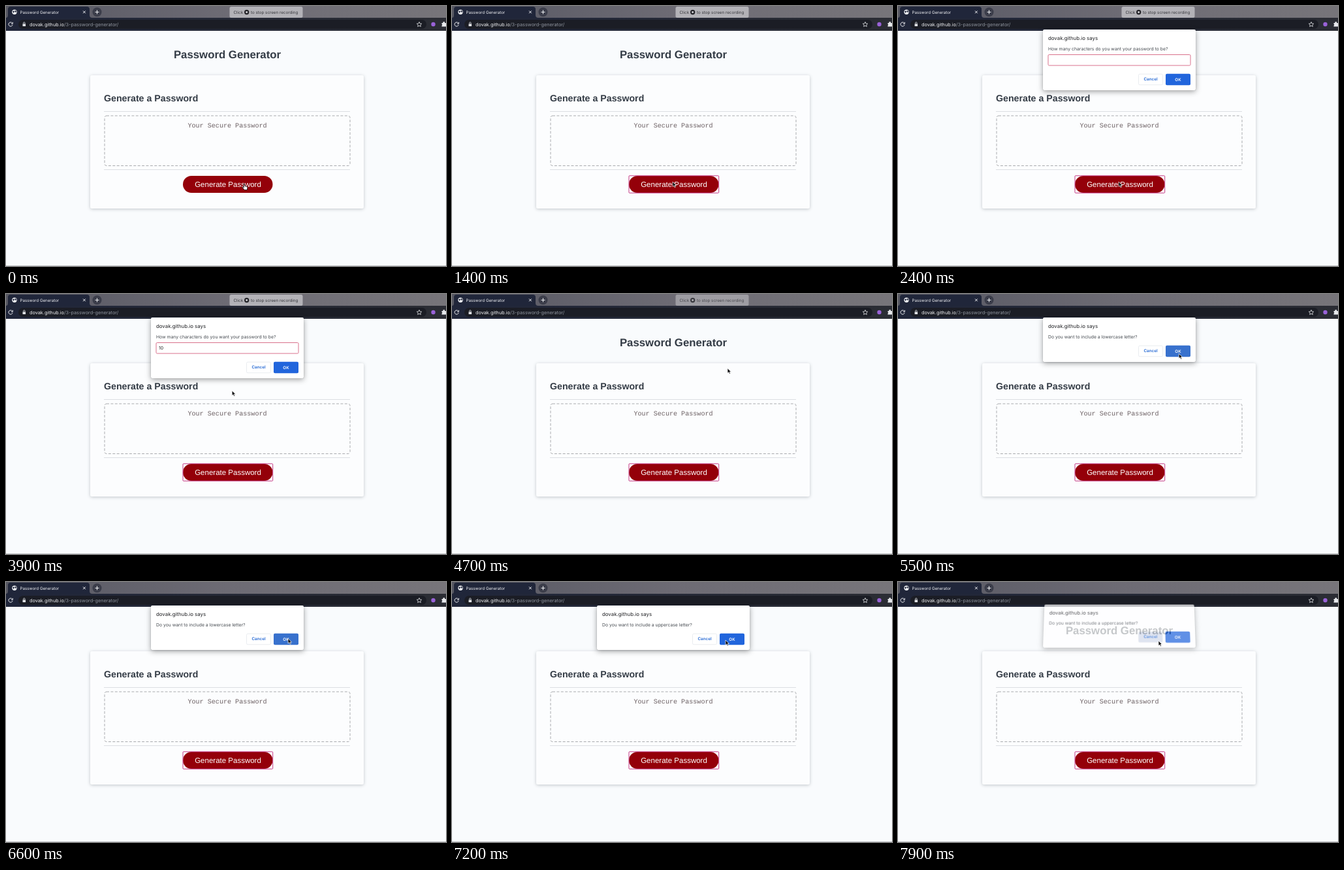
These frames come from a looping animation (674x398 px, 8000 ms). An HTML page:

```html
<!DOCTYPE html>
<html lang="en">
<head>
<meta charset="utf-8">
<title>Password Generator</title>
<style>
html, body { margin: 0; width: 100%; height: 100%; overflow: hidden; background: #f9fbfd; }
svg { position: absolute; left: 0; top: 0; display: block; overflow: visible; }
text { font-family: Inter, Roboto, sans-serif; text-rendering: geometricPrecision; white-space: pre; }
.page text { font-family: "Liberation Sans", Arial, sans-serif; }
.page .mono { font-family: "Liberation Mono", "Courier New", monospace; }
.mid { text-anchor: middle; }
#card { filter: drop-shadow(0 1px 2.5px rgba(20, 30, 40, .24)); }
#dialog {
  position: absolute; left: 222px; top: 36px; width: 234px; border-radius: 2px;
  background: #fff; box-shadow: 0 2px 8px rgba(0, 0, 0, .38), 0 0 1px rgba(0, 0, 0, .4);
  transform-origin: 50% 100%;
}
#dialog text { font-size: 6.83px; fill: #454a50; }
#dialog .btn { font-size: 6.3px; font-weight: 600; }
</style>
</head>
<body>
<svg width="674" height="398" viewBox="0 0 674 398">
  <defs>
    <linearGradient id="strip">
      <stop offset="0" stop-color="#565762"/>
      <stop offset=".5" stop-color="#6d6b74"/>
      <stop offset="1" stop-color="#77757a"/>
    </linearGradient>
    <linearGradient id="bar">
      <stop offset="0" stop-color="#20263a"/>
      <stop offset="1" stop-color="#2b2d34"/>
    </linearGradient>
  </defs>

  <!-- browser window -->
  <rect width="674" height="18" fill="url(#strip)"/>
  <rect y="18" width="674" height="20" fill="url(#bar)"/>
  <path d="M0 18Q3 18 3 14V5Q3 1 7 1H124Q128 1 128 5V14Q128 18 132 18Z" fill="#20263a"/>
  <rect x="19" y="21" width="625" height="14" rx="7" fill="#1b1d25"/>
  <circle cx="13" cy="9.3" r="3.7" fill="#eef0f3"/>
  <path d="M10 8.2l2.3-.9 1.2 1.2-1.6 1.3 .2 1.6zM14 6.4l2 1.4-.6 2.4-1.6-1.4z" fill="#20263a"/>
  <text x="21.5" y="11.6" font-size="6.2" fill="#f1f2f5">Password Generator</text>
  <path d="M118 7.4l3.8 3.8m0-3.8l-3.8 3.8" stroke="#f1f2f5"/>
  <circle cx="139.5" cy="9.3" r="7" fill="#3b3d4a"/>
  <path d="M136.5 9.3h6m-3-3v6" stroke="#f1f2f5"/>
  <path d="M9.6 26.2a3.1 3.1 0 1 0 .5 2.5M10.3 24.8v2.3h-2.4" fill="none" stroke="#f1f2f5"/>
  <rect x="25.5" y="27.2" width="4.6" height="3.8" rx=".5" fill="#dfe1e5"/>
  <path d="M26.6 27.2v-1.3a1.2 1.2 0 0 1 2.4 0v1.3" fill="none" stroke="#dfe1e5" stroke-width=".8"/>
  <text x="36" y="30.6" font-size="7.3" fill="#f1f2f5">dovak.github.io<tspan fill="#9096a0">/3-password-generator/</tspan></text>
  <path d="M633 24.4l1.1 2.4 2.6.3-1.9 1.8.5 2.6-2.3-1.3-2.3 1.3.5-2.6-1.9-1.8 2.6-.3z" fill="none" stroke="#e8eaed" stroke-width=".8"/>
  <circle cx="654.5" cy="28" r="3.2" fill="#9a62d8"/>
  <path d="M667.5 26h2a1.4 1.4 0 1 1 2.6 0h2v5.6h-6.6v-1.8a1.2 1.2 0 0 0 0-2.2z" fill="#e8eaed"/>
  <g id="pill">
    <rect x="342.5" y="1" width="112" height="17" rx="2.5" fill="#b3b2b7"/>
    <g font-size="6.25" fill="#37373c">
      <text x="348.5" y="11.7">Click</text>
      <circle cx="368.7" cy="9.5" r="3.7" fill="#26262b"/>
      <circle cx="368.7" cy="9.5" r="1.4" fill="#d8d8db"/>
      <text x="375" y="11.7">to stop screen recording</text>
    </g>
  </g>

  <!-- page -->
  <g class="page">
    <rect y="38" width="674" height="360" fill="#f9fbfd"/>
    <rect y="397" width="674" height="1" fill="#c6c8cb"/>
    <text class="mid" x="339" y="80.3" font-size="16.8" font-weight="700" fill="#343c46">Password Generator</text>
    <rect id="card" x="129" y="106" width="419" height="204" rx="2.5" fill="#fcfdfe"/>
    <text x="150" y="146.4" font-size="14.2" font-weight="700" fill="#343c46">Generate a Password</text>
    <path d="M150 161.5h377M150 250.5h377" stroke="#dcdfe3"/>
    <rect x="151" y="168" width="376" height="76.5" rx="3" fill="none" stroke="#a9abae" stroke-dasharray="4 2.4"/>
    <text class="mid mono" x="339" y="185.6" font-size="10.1" fill="#6c6063">Your Secure Password</text>
    <rect x="271" y="260" width="137.5" height="26" rx="13" fill="#940009"/>
    <text class="mid" x="340" y="276.9" font-size="11.5" fill="#fff">Generate Password</text>
    <rect id="focus" x="271" y="259.8" width="137.7" height="26.4" rx="1" fill="none" stroke="#c53b86"/>
  </g>
</svg>

<div id="dialog">
  <svg width="234" height="93">
    <text x="8" y="16.2" style="font-size:7.85px;fill:#202124">dovak.github.io says</text>
    <text id="question" x="8" y="31.8"></text>
    <g id="field">
      <rect x="8" y="38.5" width="218" height="16.5" rx="1.5" fill="#fff" stroke="#d9718c"/>
      <text id="typed" x="12" y="49.3" style="fill:#222"></text>
    </g>
    <g id="buttons">
      <rect id="cancel" x="146.5" y=".5" width="37" height="16.5" rx="2" stroke="#e4e7ec" stroke-width=".8"/>
      <text class="btn mid" x="165" y="10.8" style="fill:#2267d3">Cancel</text>
      <rect id="ok" x="188" width="38" height="17.5" rx="2"/>
      <text class="btn mid" x="207" y="10.9" style="fill:#fff">OK</text>
    </g>
  </svg>
</div>

<svg width="674" height="398">
  <path id="arrow" d="M0 0V7.6L1.8 6 3 8.7 4.4 8.1 3.2 5.5H5.6Z" fill="#0b0b0d" stroke="#fff" stroke-width=".7"/>
  <path id="hand" d="M-1-3.3q1-1 1.6 0l.4 3 3.1.7q1.1.4.9 1.6L4.3 5.5H.2L-2.7 2q-.3-1.2 1-.9l1 .9z" fill="#fff" stroke="#17171a" stroke-width=".9"/>
</svg>

<script>
const $ = id => document.getElementById(id);
const LOOP = 8000;
const clamp = x => Math.max(0, Math.min(1, x));
const between = (t, a, b) => t >= a && t < b;

// each prompt: opening start, closing start, height, question
const prompts = [
  { open: 1500, close: 4450, h: 93, text: "How many characters do you want your password to be?" },
  { open: 4750, close: 6620, h: 68, text: "Do you want to include a lowercase letter?" },
  { open: 6830, close: 7800, h: 68, text: "Do you want to include a uppercase letter?" }
];

// pointer path: time, x, y
const path = [
  [0, 365, 276], [100, 365, 276], [500, 337, 274], [1100, 337, 274], [1300, 338, 269],
  [3600, 338, 269], [3900, 346, 148], [4300, 422, 113], [4900, 422, 114], [5150, 424, 108],
  [5600, 432, 86.5], [7100, 432, 86.5], [7200, 419, 89], [7600, 399, 90], [8000, 399, 90]
];

function pointer(t) {
  const i = path.findIndex(p => p[0] > t);
  const [t0, x0, y0] = path[i - 1], [t1, x1, y1] = path[i];
  const k = (t - t0) / (t1 - t0);
  return [x0 + (x1 - x0) * k, y0 + (y1 - y0) * k];
}

function openness(p, t) {
  const rise = clamp((t - p.open) / 220), fall = clamp((t - p.close) / 190);
  return (1 - (1 - rise) ** 2) * (1 - fall ** 2);
}

function drawDialog(t) {
  const p = prompts.find(p => between(t, p.open, p.close + 190));
  const style = $("dialog").style;
  style.display = p ? "block" : "none";
  if (!p) return;
  const k = openness(p, t), away = 1 - k;
  style.height = p.h + "px";
  style.opacity = k;
  style.transform = away > 0
    ? `translateY(${-12 * away}px) perspective(400px) rotateX(${25 * away}deg)` : "none";
  $("question").textContent = p.text;
  $("field").style.display = p === prompts[0] ? "" : "none";
  $("typed").textContent = t < 3200 ? "" : t < 3400 ? "1" : "10";
  $("buttons").setAttribute("transform", `translate(0 ${p.h - 25.3})`);
  const overOk = between(t, 4300, 4650) || between(t, 5500, 6820);
  $("ok").setAttribute("fill", overOk ? "#3871cd" : "#2165dc");
  $("cancel").setAttribute("fill", t >= 7700 ? "#d3dbea" : "#fff");
}

function frame() {
  const t = performance.now() % LOOP;
  const [x, y] = pointer(t), isHand = t < 1300;
  for (const id of ["hand", "arrow"]) $(id).setAttribute("transform", `translate(${x} ${y})`);
  $("hand").style.display = isHand ? "" : "none";
  $("arrow").style.display = isHand || between(t, 2900, 3600) ? "none" : "";
  $("focus").style.display = t >= 1200 ? "" : "none";
  $("pill").style.opacity = 1 - clamp((t - 4600) / 330);
  drawDialog(t);
  requestAnimationFrame(frame);
}
frame();
</script>
</body>
</html>
```
